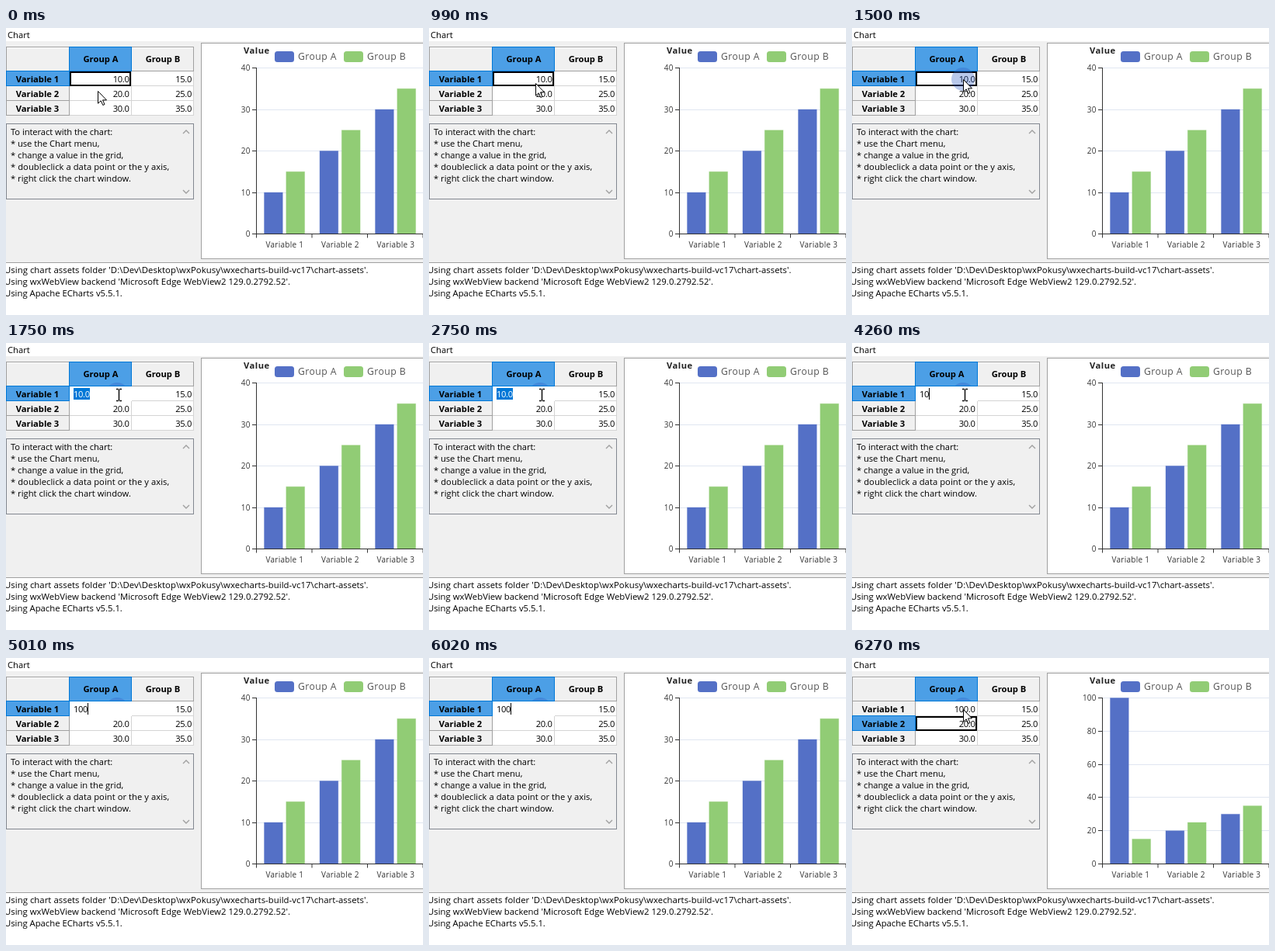
Write an HTML page that moves like this. It is 537 by 370 pixels and loops after 8 s.

```html
<!DOCTYPE html>
<html lang="en">
<head>
<meta charset="utf-8">
<title>Chart</title>
<style>
  html, body { margin: 0; width: 100%; height: 100%; overflow: hidden; background: #fff; }
  svg { display: block; width: 537px; height: 370px; }
  text { font-family: "Open Sans", "Noto Sans", sans-serif; font-size: 11.2px; white-space: pre; }
  .num { letter-spacing: -.35px; }
  .head { font-weight: 700; text-anchor: middle; }
  .log { font-size: 11.35px; }
  .axis { font-size: 10px; letter-spacing: .25px; fill: #333; }
  .legend { font-size: 12.2px; letter-spacing: .45px; fill: #555; }
</style>
</head>
<body>
<svg id="stage" viewBox="0 0 537 370" xmlns="http://www.w3.org/2000/svg"></svg>
<script>
const LOOP = 8000;
const BLUE = '#4c9fe6', EDGE = '#0078d7', FACE = '#f0f0f0', LINE = '#828790', SHADOW = '#a0a0a0', AXIS = '#333';
const SERIES = ['#5470c6', '#91cc75'];
const ROW_TOP = [56, 75, 94];
const EDIT_START = 1750, EDIT_END = 6270;

const stage = document.getElementById('stage');

function add(tag, attrs, parent = stage) {
  const el = document.createElementNS('http://www.w3.org/2000/svg', tag);
  for (const k in attrs) el.setAttribute(k, attrs[k]);
  parent.appendChild(el);
  return el;
}
const rect = (x, y, width, height, fill, parent) => add('rect', { x, y, width, height, fill }, parent);
const frame = (x, y, width, height, fill, stroke) => add('rect', { x, y, width, height, fill, stroke });
const path = (d, stroke, parent) => add('path', { d, stroke, fill: 'none' }, parent);
function label(x, y, str, attrs = {}, parent) {
  const el = add('text', { x, y, ...attrs }, parent);
  el.textContent = str;
  return el;
}
const show = (el, on) => el.setAttribute('visibility', on ? 'visible' : 'hidden');

// Latest [time, ...values] step that has started.
const stepAt = (steps, t) => steps.reduce((cur, s) => (t >= s[0] ? s : cur));

// Window
rect(0, 0, 537, 370, '#fff');
rect(0, 17, 537, 287, FACE);
label(2, 13, 'Chart');

// Grid
rect(82, 56, 160, 57, '#fff');
path('M82 74.5H242M82 93.5H242M82 112.5H242M161.5 56V113M241.5 56V113', '#d4d4d4');
path('M0 24.5H242M0 55.5H242M0 74.5H82M0 93.5H82M0 112.5H82M.5 24V113M81.5 24V113M161.5 24V56M241.5 24V56', SHADOW);
path('M1 25.5H81M162 25.5H241', '#fff');
frame(81.5, 24.5, 80, 31, BLUE, EDGE);
const rowMark = frame(.5, 0, 81, 19, BLUE, EDGE);
label(122, 44, 'Group A', { class: 'head' });
label(202, 44, 'Group B', { class: 'head' });
const right = { class: 'num', 'text-anchor': 'end' };
const cells = ROW_TOP.map((y, i) => {
  label(40.5, y + 14, 'Variable ' + (i + 1), { class: 'head' });
  label(239, y + 14, (15 + 10 * i).toFixed(1), right);
  return label(158.5, y + 14, (10 + 10 * i).toFixed(1), right);
});
const focus = add('rect', { x: 83, width: 77, height: 17, fill: 'none', stroke: '#000', 'stroke-width': 2 });

// Click halo and cell editor
const halo = add('path', { fill: '#2f5fc4', 'fill-opacity': .34 });
const editor = add('g', {});
rect(82, 56, 80, 19, '#fff', editor);
const selection = rect(87, 58, 21, 15, EDGE, editor);
const entry = label(87, 70, '', { class: 'num' }, editor);
const caret = rect(0, 58, 1, 15, '#000', editor);

// Help box
frame(.5, 123.5, 241, 97, FACE, LINE);
[
  ['To interact with the chart:', -.06],
  ['* use the Chart menu,', -.04],
  ['* change a value in the grid,', 0],
  ['* doubleclick a data point or the y axis,', .06],
  ['* right click the chart window.', .02]
].forEach(([str, gap], i) => label(6, 138 + 15 * i, str, { 'letter-spacing': gap }));
path('M228 136l4 -4l4 4M228 209l4 4l4 -4', SHADOW).setAttribute('stroke-width', 1.4);

// Chart
frame(251.5, 19.5, 300, 278, '#fff', SHADOW);
const BASE = 265.5, HEIGHT = 214, LEFT = 322.5, BAND = 71.5;
const plot = add('g', {});
path(`M${LEFT} 51V${BASE}H537`, AXIS);
for (let i = 0; i < 4; i++) path(`M${LEFT + BAND * i} ${BASE}v5`, AXIS);
for (let i = 0; i < 3; i++) {
  label(LEFT + BAND * (i + .5) + .6, 283.3, 'Variable ' + (i + 1), { class: 'axis', 'text-anchor': 'middle' });
}
label(306, 32.6, 'Value', { 'font-weight': 700, 'letter-spacing': .5, fill: '#222' });
['Group A', 'Group B'].forEach((name, i) => {
  add('rect', { x: 346 + 89 * i, y: 30, width: 25, height: 14, rx: 3.5, fill: SERIES[i] });
  label(376 + 89 * i, 41.3, name, { class: 'legend' });
});

function drawPlot(first, max, step) {
  plot.textContent = '';
  const yOf = v => BASE - v / max * HEIGHT;
  for (let v = 0; v <= max; v += step) {
    const y = Math.floor(yOf(v)) + .5;
    if (v) path(`M323 ${y}H537`, '#e0e6f1', plot);
    path(`M317 ${y}H323`, AXIS, plot);
    label(314.8, y + 3.3, v, { class: 'axis', 'text-anchor': 'end' }, plot);
  }
  [[first, 15], [20, 25], [30, 35]].forEach((pair, i) => pair.forEach((v, s) => {
    const bar = rect(LEFT + BAND * i + 10 + 28.3 * s, yOf(v), 23.8, BASE - yOf(v), SERIES[s], plot);
    bar.setAttribute('stroke', SERIES[s]);
    bar.setAttribute('stroke-opacity', .3);
  }));
}

// Log
rect(0, 302, 537, 68, '#fff');
path('M0 302.5H537', SHADOW);
[
  ["Using chart assets folder 'D:\\Dev\\Desktop\\wxPokusy\\wxecharts-build-vc17\\chart-assets'.", .04],
  ["Using wxWebView backend 'Microsoft Edge WebView2 129.0.2792.52'.", .01],
  ['Using Apache ECharts v5.5.1.', -.03]
].forEach(([str, gap], i) => label(-2, 316 + 15 * i, str, { class: 'log', 'letter-spacing': gap }));

// Pointers
const arrow = add('path', {
  d: 'M.5 .5V16.2L4.2 12.8L6.8 18.5L9 17.5L6.5 11.9H11.5Z',
  fill: '#fff', stroke: '#000', 'stroke-width': 1
});
const beam = path('M142 59.5H145M146 59.5H149M145.5 60V74M142 74.5H145M146 74.5H149', '#000');
beam.setAttribute('stroke-width', 1.4);

const ARROW = [[0, 118, 81], [990, 137, 71], [1240, 143, 66]];
const ENTRY = [[0, '10.0', 108], [4010, '10.', 102], [4260, '10', 99], [5010, '100', 105]];
const CARET = [[0, 0], [2250, 1], [2750, 0], [3260, 1], [3760, 0], [4010, 1], [4760, 0], [5010, 1], [5520, 0], [6020, 1]];

let plotted = null;

function render(t) {
  const editing = t >= EDIT_START && t < EDIT_END;
  const done = t >= EDIT_END;
  const selected = editing && t < 3260;
  const top = ROW_TOP[done ? 1 : 0];

  rowMark.setAttribute('y', top - .5);
  focus.setAttribute('y', top + 1);
  show(focus, !editing);
  cells[0].textContent = done ? '100.0' : '10.0';

  // Only the part over the column header survives the repaint.
  halo.setAttribute('d', t < EDIT_START
    ? 'M128 66a15 15 0 1 1 30 0a15 15 0 1 1 -30 0Z'
    : 'M132.8 55A15 15 0 0 1 153.2 55Z');
  show(halo, t >= 1500);

  const [, str, caretX] = stepAt(ENTRY, t);
  show(editor, editing);
  show(selection, selected);
  entry.textContent = str;
  entry.setAttribute('fill', selected ? '#fff' : '#000');
  caret.setAttribute('x', caretX);
  show(caret, editing && stepAt(CARET, t)[1]);

  const [, x, y] = stepAt(ARROW, t);
  arrow.setAttribute('transform', `translate(${x} ${y})`);
  show(arrow, !editing);
  show(beam, editing && t < 5010);

  if (plotted !== done) {
    plotted = done;
    if (done) drawPlot(100, 100, 20);
    else drawPlot(10, 40, 10);
  }
}

const start = performance.now();
function tick() {
  render((performance.now() - start) % LOOP);
  requestAnimationFrame(tick);
}
tick();
</script>
</body>
</html>
```
